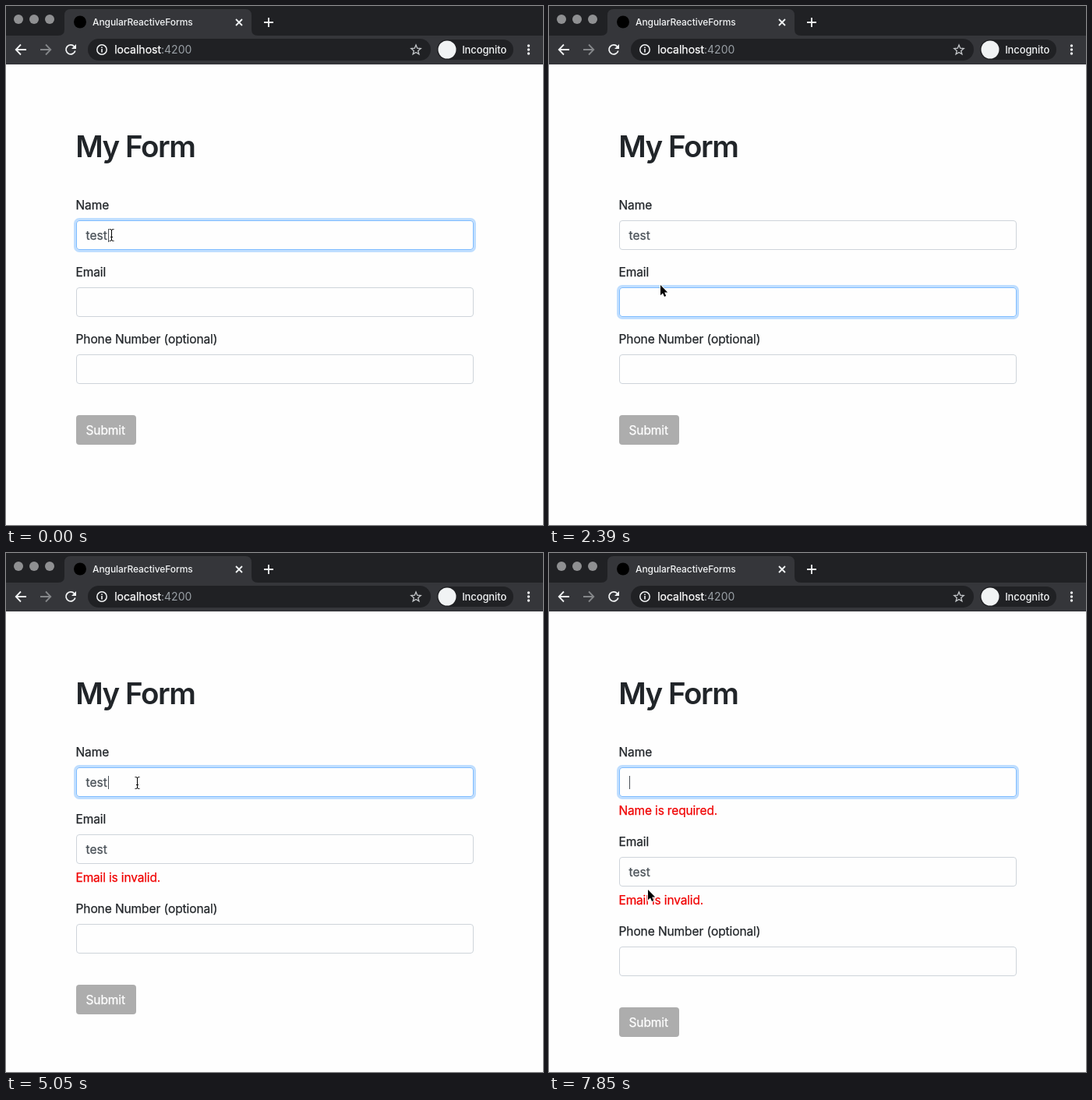
Recreate the animation shown at these times as an HTML page. Size 689x666 px, loop 7.99 s.

```html
<!DOCTYPE html>
<html lang="en">
<head>
<meta charset="utf-8">
<title>AngularReactiveForms</title>
<style>
html, body { margin: 0; width: 100%; height: 100%; overflow: hidden; background: #fefefe; }
svg { display: block; width: 689px; height: 666px; }
text { font: 15.5px Inter, "Liberation Sans", sans-serif; letter-spacing: -.08px; color: #212529; fill: currentColor; stroke: currentColor; stroke-width: .25px; }
.title { font-size: 38.5px; font-weight: 600; letter-spacing: -1.45px; stroke: none; }
.value { color: #495057; letter-spacing: .05px; }
.error { color: #f00000; letter-spacing: -.16px; }
.light { color: #fff; }
.tab { font-size: 12px; font-weight: 500; letter-spacing: -.08px; color: #f1f3f4; stroke: none; }
.url { font-size: 14px; letter-spacing: 0; color: #fff; }
.port { color: #9aa0a6; fill: currentColor; stroke: none; }
.mode { font-size: 13px; font-weight: 500; letter-spacing: -.12px; color: #f1f3f4; stroke: none; }
.box { fill: #fefefe; stroke: #ced4da; }
.ring { fill: none; stroke: #bfdeff; stroke-width: 3; }
.active { fill: #fefefe; stroke: #80bdff; }
.icon { fill: none; stroke: #f1f3f4; stroke-width: 1.8; }
.caret { stroke: #495057; }

.anim { animation: 7.99s step-end infinite; }
#nameFocus { animation-name: name-focus; }
#emailFocus { animation-name: email-focus; }
#nameValue { animation-name: name-value; }
#nameError { animation-name: name-error; }
#emailError { animation-name: email-error; }
#nameCaret { animation-name: name-caret; }
#emailCaret { animation-name: email-caret; }
#selection { animation-name: selection; }
#lower { animation-name: push-lower; }
#lowest { animation-name: push-lowest; }
#key1 { animation-name: key1; }
#key2 { animation-name: key2; }
#key3 { animation-name: key3; }
#key4 { animation-name: key4; }
#pointer { animation-name: pointer-path; }
#beam { animation-name: beam; }
#arrow { animation-name: arrow; }

@keyframes name-focus {
  0%, 59.44% { visibility: visible }
  11.13% { visibility: hidden }
  100% { visibility: visible }
}
@keyframes email-focus {
  0%, 59.44%, 100% { visibility: hidden }
  11.13% { visibility: visible }
}
@keyframes name-value {
  0% { visibility: visible }
  87.23%, 100% { visibility: hidden }
}
@keyframes name-error {
  0% { visibility: hidden }
  87.23%, 100% { visibility: visible }
}
@keyframes email-error {
  0% { visibility: hidden }
  37.29%, 100% { visibility: visible }
}
@keyframes push-lower {
  0% { transform: none }
  87.23%, 100% { transform: translateY(29px) }
}
@keyframes push-lowest {
  0% { transform: none }
  37.29%, 100% { transform: translateY(29px) }
}
@keyframes key1 { 0% { visibility: hidden } 37.29%, 100% { visibility: visible } }
@keyframes key2 { 0% { visibility: hidden } 40.92%, 100% { visibility: visible } }
@keyframes key3 { 0% { visibility: hidden } 44.68%, 100% { visibility: visible } }
@keyframes key4 { 0% { visibility: hidden } 46.55%, 100% { visibility: visible } }
@keyframes name-caret {
  0%, 59.44%, 72.46% { visibility: visible; transform: translateX(28px) }
  3.75%, 66.83%, 77.97% { visibility: hidden }
  87.23% { visibility: visible; transform: none }
  92.74% { visibility: hidden }
  98.24%, 100% { visibility: visible; transform: none }
}
@keyframes email-caret {
  0%, 16.77%, 29.91% { visibility: hidden; transform: none }
  11.13%, 22.4% { visibility: visible }
  35.41% { visibility: visible; transform: none }
  37.29% { transform: translateX(5px) }
  40.92% { transform: translateX(14px) }
  44.68% { transform: translateX(23px) }
  46.55% { transform: translateX(28px) }
  48.43% { visibility: hidden }
  54.06% { visibility: visible }
  59.44%, 100% { visibility: hidden; transform: translateX(28px) }
}
@keyframes selection {
  0% { visibility: hidden }
  81.72% { visibility: visible }
  87.23%, 100% { visibility: hidden }
}
@keyframes beam {
  0%, 9.26%, 52.19%, 57.69%, 76.09% { visibility: visible }
  5.5%, 20.52%, 54.06%, 72.46%, 87.23%, 100% { visibility: hidden }
}
@keyframes arrow {
  0%, 9.26%, 37.29%, 52.19%, 57.69%, 76.09% { visibility: hidden }
  5.5%, 20.52%, 48.43%, 54.06%, 72.46%, 92.74%, 100% { visibility: visible }
}
@keyframes pointer-path {
  0% { transform: translate(135px, 294px) }
  1.87% { transform: translate(135px, 297px) }
  3.75% { transform: translate(135px, 308px) }
  5.5% { transform: translate(135px, 326px) }
  7.38% { transform: translate(134px, 352px) }
  9.26% { transform: translate(135px, 376px) }
  11.13% { transform: translate(135px, 382px) }
  13.01% { transform: translate(135px, 383px) }
  18.64% { transform: translate(139px, 370px) }
  20.52% { transform: translate(144px, 340px) }
  22.4% { transform: translate(146px, 317px) }
  24.28% { transform: translate(145px, 328px) }
  26.15% { transform: translate(143px, 350px) }
  28.03% { transform: translate(143px, 359px) }
  29.91% { transform: translate(143px, 358px) }
  35.41% { transform: translate(143px, 356px) }
  48.43% { transform: translate(143px, 410px) }
  50.31% { transform: translate(144px, 454px) }
  52.19% { transform: translate(145px, 483px) }
  54.06% { transform: translate(149px, 448px) }
  55.81% { transform: translate(159px, 348px) }
  57.69% { transform: translate(167px, 303px) }
  59.44% { transform: translate(168px, 296px) }
  63.2% { transform: translate(168px, 295px) }
  64.95% { transform: translate(170px, 295px) }
  70.58% { transform: translate(180px, 300px) }
  72.46% { transform: translate(172px, 338px) }
  74.34% { transform: translate(158px, 354px) }
  76.09% { transform: translate(146px, 311px) }
  77.97% { transform: translate(139px, 294px) }
  79.84% { transform: translate(136px, 290px) }
  81.72% { transform: translate(98px, 291px) }
  83.47% { transform: translate(60px, 292px) }
  85.35% { transform: translate(55px, 293px) }
  92.74% { transform: translate(60px, 318px) }
  94.61% { transform: translate(80px, 362px) }
  96.36% { transform: translate(110px, 408px) }
  98.24%, 100% { transform: translate(127px, 432px) }
}
</style>
</head>
<body>
<svg viewBox="0 0 689 666">
  <defs>
    <rect id="field" x="90.5" y="275.5" width="509" height="37" rx="3.5"/>
    <g id="focus">
      <rect class="ring" x="88.5" y="273.5" width="513" height="41" rx="5.5"/>
      <use href="#field" class="active"/>
    </g>
    <path id="beamShape" d="M-2.5 -7.5H-1.5Q.5 -7.5 .5 -6Q.5 -7.5 2.5 -7.5H3.5M.5 -6V6M-2.5 7.5H-1.5Q.5 7.5 .5 6Q.5 7.5 2.5 7.5H3.5M-1 2.5H2"/>
  </defs>

  <!-- Browser -->
  <rect width="689" height="75" fill="#202124"/>
  <rect y="38" width="689" height="37" fill="#35363a"/>
  <g fill="#8f9092">
    <circle cx="16" cy="17" r="6"/><circle cx="36" cy="17" r="6"/><circle cx="56" cy="17" r="6"/>
  </g>
  <path d="M67 38Q75 38 75 30V12Q75 4 83 4H307Q315 4 315 12V30Q315 38 323 38Z" fill="#35363a"/>
  <circle cx="95" cy="20.5" r="8" fill="#000"/>
  <text class="tab" x="111" y="25">AngularReactiveForms</text>
  <path class="icon" d="M295 17L303 25M303 17L295 25"/>
  <path class="icon" d="M337 15V27M331 21H343"/>
  <path class="icon" d="M26 56H13M19 49.5L12.7 56L19 62.5"/>
  <path class="icon" d="M44 56H57M51 49.5L57.3 56L51 62.5" style="stroke:#85878a"/>
  <path class="icon" d="M87.6 52A6 6 0 1 0 88.8 57.6"/>
  <path d="M90 49V55H84Z" fill="#f1f3f4"/>
  <rect x="105" y="42" width="440" height="28" rx="14" fill="#202124"/>
  <circle class="icon" cx="123" cy="56" r="6.2" style="stroke-width:1.5"/>
  <path d="M122.2 55H123.8V59.5H122.2ZM122.2 52.4H123.8V54H122.2Z" fill="#f1f3f4"/>
  <text class="url" x="139.2" y="61">localhost<tspan class="port">:4200</tspan></text>
  <path d="M526 50L527.7 54.2L532.2 54.5L528.7 57.4L529.9 61.8L526 59.4L522.1 61.8L523.3 57.4L519.8 54.5L524.3 54.2Z" fill="none" stroke="#c4c7ca" stroke-width="1.3"/>
  <rect x="553" y="43" width="98" height="26" rx="13" fill="#202124"/>
  <circle cx="566" cy="56" r="11.5" fill="#f1f3f4"/>
  <text class="mode" x="585.2" y="61">Incognito</text>
  <g fill="#f1f3f4">
    <circle cx="670.5" cy="51" r="1.7"/><circle cx="670.5" cy="56" r="1.7"/><circle cx="670.5" cy="61" r="1.7"/>
  </g>

  <!-- Form -->
  <text class="title" x="89.2" y="194.3">My Form</text>
  <text x="89.5" y="261">Name</text>
  <use href="#field" class="box"/>
  <g id="nameFocus" class="anim"><use href="#focus"/></g>
  <rect id="selection" class="anim" x="102" y="285" width="29" height="19" fill="#b3d7ff"/>
  <text id="nameValue" class="value anim" x="102.5" y="300">test</text>
  <path id="nameCaret" class="caret anim" d="M103.5 286V303"/>
  <text id="nameError" class="error anim" x="89.5" y="336">Name is required.</text>

  <g id="lower" class="anim">
    <text x="89.5" y="347">Email</text>
    <use href="#field" y="86" class="box"/>
    <g id="emailFocus" class="anim"><use href="#focus" y="86"/></g>
    <text class="value" x="102.5" y="386"><tspan id="key1" class="anim">t</tspan><tspan id="key2" class="anim">e</tspan><tspan id="key3" class="anim">s</tspan><tspan id="key4" class="anim">t</tspan></text>
    <path id="emailCaret" class="caret anim" d="M103.5 372V389"/>
    <text id="emailError" class="error anim" x="89.5" y="422">Email is invalid.</text>

    <g id="lowest" class="anim">
      <text x="89.5" y="433">Phone Number (optional)</text>
      <use href="#field" y="172" class="box"/>
      <rect x="90" y="525" width="77" height="38" rx="4" fill="#adadad"/>
      <text class="light" x="102.5" y="550">Submit</text>
    </g>
  </g>

  <!-- Mouse -->
  <g id="pointer" class="anim">
    <g id="beam" class="anim" fill="none">
      <use href="#beamShape" stroke="#fff" stroke-width="2.2" stroke-opacity=".8"/>
      <use href="#beamShape" stroke="#000"/>
    </g>
    <path id="arrow" class="anim" d="M0 0V13.2L3 10.4L5 15L7.2 14L5.2 9.6H9.2Z" fill="#000" stroke="#fff" stroke-width="1.8" paint-order="stroke"/>
  </g>
</svg>
</body>
</html>
```
